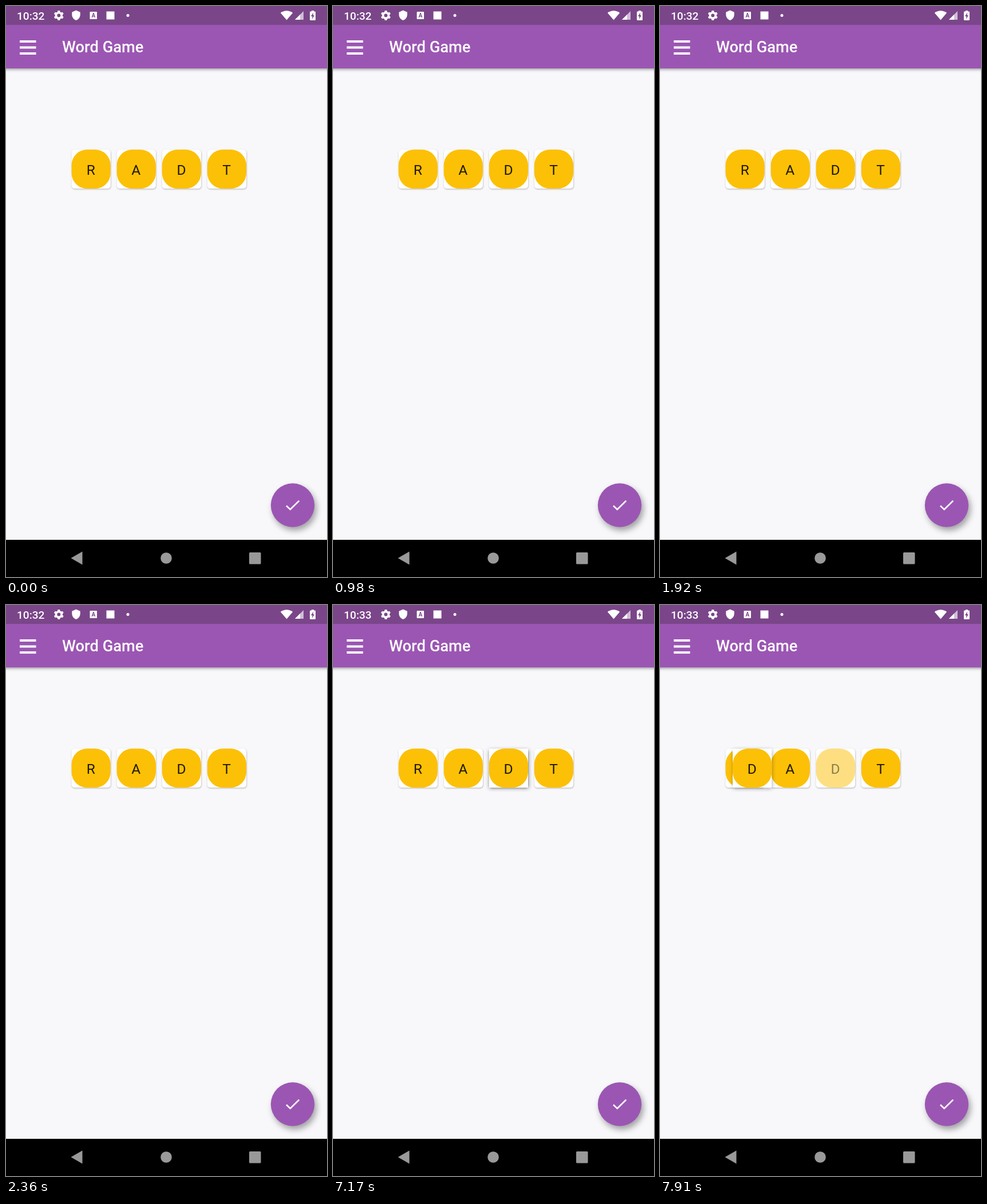
Recreate the animation shown at these times as an HTML page with a canvas. Size 561 by 998 pixels, loop 8 s.

```html
<!DOCTYPE html>
<html lang="en">
<head>
<meta charset="utf-8">
<title>Word Game</title>
<style>
html, body { margin: 0; width: 100%; height: 100%; overflow: hidden; background: #000; }
canvas { display: block; width: 561px; height: 998px; }
</style>
</head>
<body>
<canvas id="stage" width="561" height="998"></canvas>
<script>
const ctx = document.getElementById('stage').getContext('2d');
const W = 561, LOOP = 8000;
const PURPLE = '#9b56b3', STATUS = '#7a4689', PAPER = '#f8f8fb', AMBER = '#fcc007', NAV = '#999';
const TILE = { x: 114.5, y: 251, size: 68.3, pitch: 79.1 };
const LETTERS = ['R', 'A', 'D', 'T'];
const DRAGGED = 2;
// Pointer samples of the drag: [time, tile left edge]
const DRAG = [[7170, 272.7], [7250, 269], [7530, 263], [7760, 243], [7910, 127]];

function rect(x, y, w, h, color) {
  ctx.fillStyle = color;
  ctx.fillRect(x, y, w, h);
}

function round(x, y, w, h, r, color) {
  ctx.beginPath();
  ctx.roundRect(x, y, w, h, r);
  ctx.fillStyle = color;
  ctx.fill();
}

function disc(x, y, r, color) {
  ctx.beginPath();
  ctx.arc(x, y, r, 0, Math.PI * 2);
  ctx.fillStyle = color;
  ctx.fill();
}

function poly(points, color) {
  ctx.beginPath();
  points.forEach(([x, y]) => ctx.lineTo(x, y));
  ctx.closePath();
  ctx.fillStyle = color;
  ctx.fill();
}

function text(str, x, y, size, weight, color, align = 'left') {
  ctx.font = `${weight} ${size}px Roboto, sans-serif`;
  ctx.textAlign = align;
  ctx.fillStyle = color;
  ctx.fillText(str, x, y);
}

function withShadow(alpha, dx, dy, blur, draw) {
  ctx.save();
  ctx.shadowColor = `rgba(0,0,0,${alpha})`;
  ctx.shadowOffsetX = dx;
  ctx.shadowOffsetY = dy;
  ctx.shadowBlur = blur;
  draw();
  ctx.restore();
}

function gear(x, y) {
  ctx.save();
  ctx.translate(x, y);
  for (let i = 0; i < 6; i++) {
    poly([[-2.5, -5], [-1.8, -8.6], [1.8, -8.6], [2.5, -5]], '#fff');
    ctx.rotate(Math.PI / 3);
  }
  disc(0, 0, 6.6, '#fff');
  disc(0, 0, 3, STATUS);
  ctx.restore();
}

function shield(x, y) {
  ctx.beginPath();
  ctx.moveTo(x, y - 8.5);
  ctx.lineTo(x + 7.2, y - 5.3);
  ctx.lineTo(x + 7.2, y);
  ctx.quadraticCurveTo(x + 6.5, y + 6.5, x, y + 9);
  ctx.quadraticCurveTo(x - 6.5, y + 6.5, x - 7.2, y);
  ctx.lineTo(x - 7.2, y - 5.3);
  ctx.closePath();
  ctx.fillStyle = '#fff';
  ctx.fill();
}

function wifi() {
  ctx.beginPath();
  ctx.moveTo(479.8, 12);
  ctx.quadraticCurveTo(490.5, 4.5, 501.2, 12);
  ctx.lineTo(490.5, 24.5);
  ctx.closePath();
  ctx.fillStyle = '#fff';
  ctx.fill();
}

function battery() {
  rect(534, 8, 4, 3, '#fff');
  round(531, 9.5, 10, 15.5, 1.2, '#fff');
  poly([[537, 11.5], [533, 18], [535.5, 18], [535, 23], [539, 16.3], [536.6, 16.3]], STATUS);
}

function statusBar(t) {
  rect(0, 0, W, 33, STATUS);
  text(t < 4460 ? '10:32' : '10:33', 19, 24, 19.1, 500, '#fff');
  gear(92.3, 16.5);
  shield(122.5, 16);
  round(146.5, 10, 12.5, 13, 1, '#fff');
  text('A', 152.8, 20.3, 10, 700, STATUS, 'center');
  rect(175.5, 9.5, 14, 14, '#fff');
  disc(213, 16.5, 2.5, '#fff');
  wifi();
  poly([[505, 24], [520, 24], [520, 9]], 'rgba(255,255,255,.65)');
  poly([[505, 24], [514, 24], [514, 15]], '#fff');
  battery();
}

function appBar() {
  withShadow(0.38, 0, 2, 5, () => rect(-10, 33, W + 20, 76, PURPLE));
  for (let i = 0; i < 3; i++) rect(24, 60 + i * 10.5, 28.5, 4, '#fff');
  text('Word Game', 98, 81, 27.27, 500, '#fff');
}

function tileFace(letter, x) {
  const { y, size } = TILE;
  round(x, y, size, size, 27.3, AMBER);
  text(letter, x + size / 2 - 0.4, y + 43.6, 24.5, 400, 'rgba(0,0,0,.87)', 'center');
}

function card(letter, x, faded) {
  const { y, size } = TILE;
  withShadow(0.3, 0.4, 1, 2.5, () => round(x, y, size, size, 5.4, '#fff'));
  ctx.globalAlpha = faded ? 0.5 : 1;
  tileFace(letter, x);
  ctx.globalAlpha = 1;
}

function liftedTile(letter, x) {
  const { y, size } = TILE;
  withShadow(0.38, 0.5, 2, 7, () => rect(x, y, size, size, '#fff'));
  tileFace(letter, x);
}

function tiles(t) {
  const drag = DRAG.findLast(([start]) => t >= start);
  LETTERS.forEach((letter, i) =>
    card(letter, TILE.x + i * TILE.pitch, drag && i === DRAGGED));
  if (drag) liftedTile(LETTERS[DRAGGED], drag[1]);
}

function checkButton() {
  withShadow(0.36, 3.5, 6, 11, () => disc(501, 872.5, 38.2, PURPLE));
  ctx.beginPath();
  ctx.moveTo(490, 873.5);
  ctx.lineTo(496.8, 880);
  ctx.lineTo(512.3, 864.8);
  ctx.strokeStyle = '#fff';
  ctx.lineWidth = 2.6;
  ctx.stroke();
}

function navBar() {
  rect(0, 933, W, 65, '#000');
  poly([[113.5, 965], [133.5, 953.5], [133.5, 976.5]], NAV);
  disc(280, 965, 9.8, NAV);
  round(425, 955, 20.5, 20.5, 1.5, NAV);
}

function draw(t) {
  rect(0, 0, W, 998, PAPER);
  appBar();
  statusBar(t);
  tiles(t);
  checkButton();
  navBar();
}

const start = performance.now();
function tick() {
  draw((performance.now() - start) % LOOP);
  requestAnimationFrame(tick);
}
tick();
</script>
</body>
</html>
```
